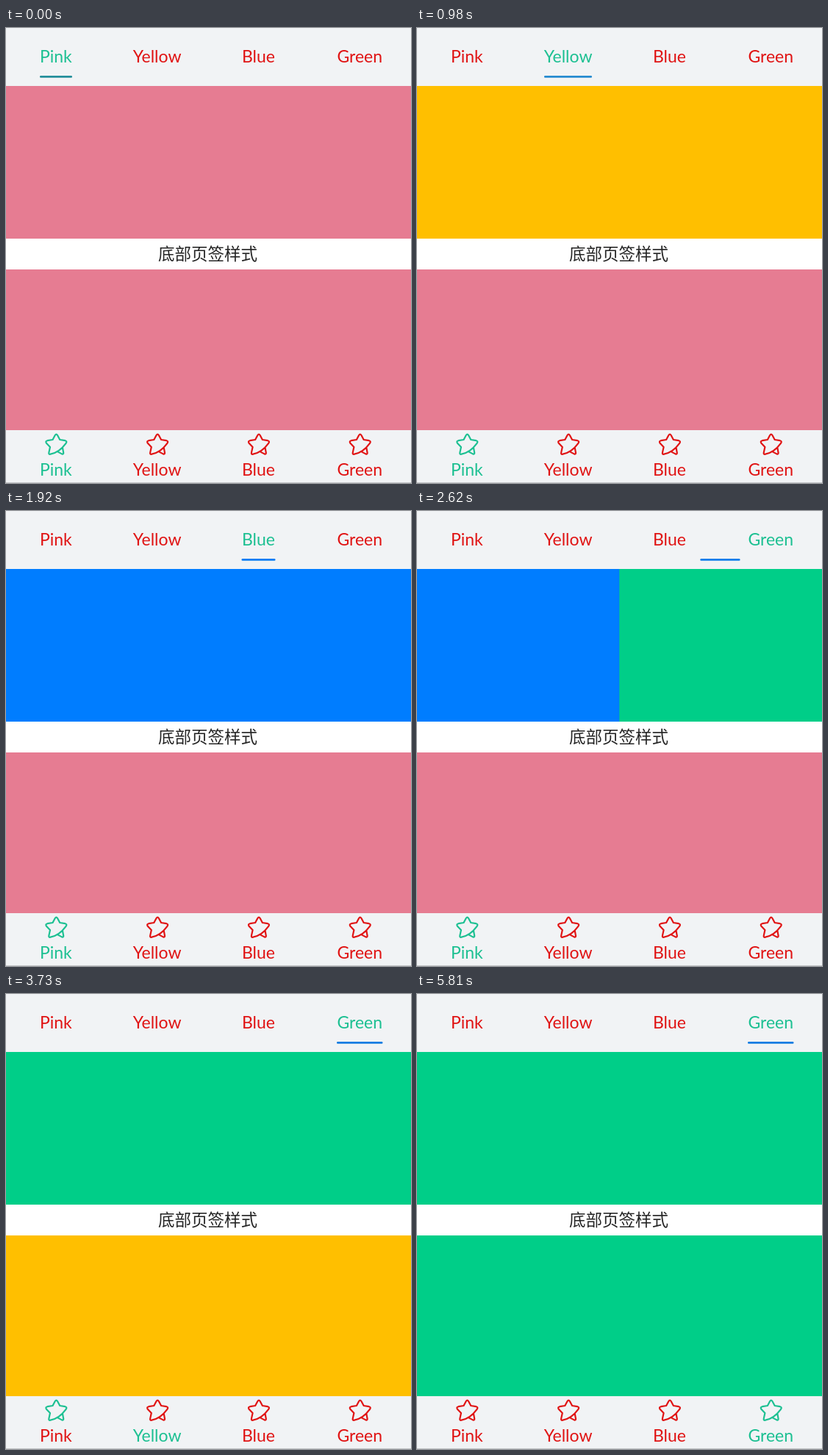
An HTML page that plays this animation: 551x620 px, repeating every 7.29 s.

```html
<!DOCTYPE html>
<html lang="zh-CN">
<head>
<meta charset="utf-8">
<title>Tabs</title>
<style>
:root {
  --on: #1dc092; --off: #e01414;
  --pink: #e67c92; --yellow: #ffbf00; --blue: #007dff; --green: #00ce88;
  --slide: cubic-bezier(.25, .1, .2, 1);
}
html, body { margin: 0; width: 100%; height: 100%; overflow: hidden; background: #fff; }
svg { display: block; }
text { font: 23px Lato, sans-serif; text-anchor: middle; fill: currentColor; }
.title { font: 22.5px "Noto Sans CJK SC", "Noto Sans CJK", sans-serif; color: #242424; }
.star { fill: none; stroke: currentColor; stroke-width: 2.2; stroke-linecap: round; stroke-linejoin: round; }

.tab, .panel { animation: 7.29s step-end infinite; }
.pages, .line { animation: pages 7.29s var(--slide) infinite; }
.line { animation-name: line; }
.panel { animation-name: panel; }

@keyframes pages {
  0%, 9.328% { transform: translateX(0); }
  13.443%, 20.988% { transform: translateX(-551px); }
  26.337%, 34.705% { transform: translateX(-1102px); }
  39.232%, to { transform: translateX(-1653px); }
}
@keyframes line {
  0%, 9.328% { x: 46px; width: 44px; fill: #248f9b; }
  13.443%, 20.988% { x: 173px; width: 65px; fill: #268bd0; }
  26.337%, 34.705% { x: 320.5px; width: 46px; fill: #087df4; }
  39.232%, to { x: 450px; width: 62.5px; fill: #147de2; }
}
@keyframes panel {
  0% { fill: var(--pink); }
  51.166% { fill: var(--yellow); }
  63.512% { fill: var(--blue); }
  77.366%, to { fill: var(--green); }
}

/* upper labels */
@keyframes top0 { 0% { color: var(--on); } 9.328%, to { color: var(--off); } }
@keyframes top1 { 0%, 20.988%, to { color: var(--off); } 9.328% { color: var(--on); } }
@keyframes top2 { 0%, 34.705%, to { color: var(--off); } 20.988% { color: var(--on); } }
@keyframes top3 { 0% { color: var(--off); } 34.705%, to { color: var(--on); } }

/* lower labels */
@keyframes low0 { 0% { color: var(--on); } 51.166%, to { color: var(--off); } }
@keyframes low1 { 0%, 63.512%, to { color: var(--off); } 51.166% { color: var(--on); } }
@keyframes low2 { 0%, 77.366%, to { color: var(--off); } 63.512% { color: var(--on); } }
@keyframes low3 { 0% { color: var(--off); } 77.366%, to { color: var(--on); } }

/* icons follow their labels a little later */
@keyframes icon0 { 0% { color: var(--on); } 51.989%, to { color: var(--off); } }
@keyframes icon1 { 0%, 64.883%, to { color: var(--off); } 51.989% { color: var(--on); } }
@keyframes icon2 { 0%, 78.189%, to { color: var(--off); } 64.883% { color: var(--on); } }
@keyframes icon3 { 0% { color: var(--off); } 78.189%, to { color: var(--on); } }
</style>
</head>
<body>
<svg width="551" height="620" viewBox="0 0 551 620">
  <defs>
    <path id="star" class="star" d="M-8.7 13.4Q-10.5 13.4-10 11L-8.4 3.6L-13.4-1.6Q-15.2-4.4-12-5.2L-4.9-6.4L-1.7-12.4Q0-15 1.7-12.4L4.9-6.4L12-5.2Q15.2-4.4 13.2-1.6C8 5.5 1 12-8.7 13.4M8.5 4.2L9.8 11.4Q10 13.9 7.6 13L2.3 10.2"/>
  </defs>
  <rect width="551" height="79" fill="#f1f3f5"/>
  <text class="tab" x="67.8" y="47.3" style="animation-name:top0">Pink</text>
  <text class="tab" x="205.6" y="47.3" style="animation-name:top1">Yellow</text>
  <text class="tab" x="343.4" y="47.3" style="animation-name:top2">Blue</text>
  <text class="tab" x="481.2" y="47.3" style="animation-name:top3">Green</text>
  <rect class="line" y="65" height="2.8" rx="1.3"/>

  <svg y="79" width="551" height="208" overflow="hidden">
    <g class="pages">
      <rect width="551" height="208" fill="var(--pink)"/>
      <rect x="551" width="551" height="208" fill="var(--yellow)"/>
      <rect x="1102" width="551" height="208" fill="var(--blue)"/>
      <rect x="1653" width="551" height="208" fill="var(--green)"/>
    </g>
  </svg>

  <text class="title" x="274.5" y="316">底部页签样式</text>

  <rect class="panel" y="329" width="551" height="219"/>
  <rect y="548" width="551" height="71" fill="#f1f3f5"/>
  <rect y="619" width="551" height="1" fill="#c3c5c7"/>
  <g class="tab" style="animation-name:icon0"><use href="#star" x="68.4" y="567.4"/></g>
  <g class="tab" style="animation-name:icon1"><use href="#star" x="206.2" y="567.4"/></g>
  <g class="tab" style="animation-name:icon2"><use href="#star" x="344" y="567.4"/></g>
  <g class="tab" style="animation-name:icon3"><use href="#star" x="481.8" y="567.4"/></g>
  <text class="tab" x="67.8" y="609.6" style="animation-name:low0">Pink</text>
  <text class="tab" x="205.6" y="609.6" style="animation-name:low1">Yellow</text>
  <text class="tab" x="343.4" y="609.6" style="animation-name:low2">Blue</text>
  <text class="tab" x="481.2" y="609.6" style="animation-name:low3">Green</text>
</svg>
</body>
</html>
```
